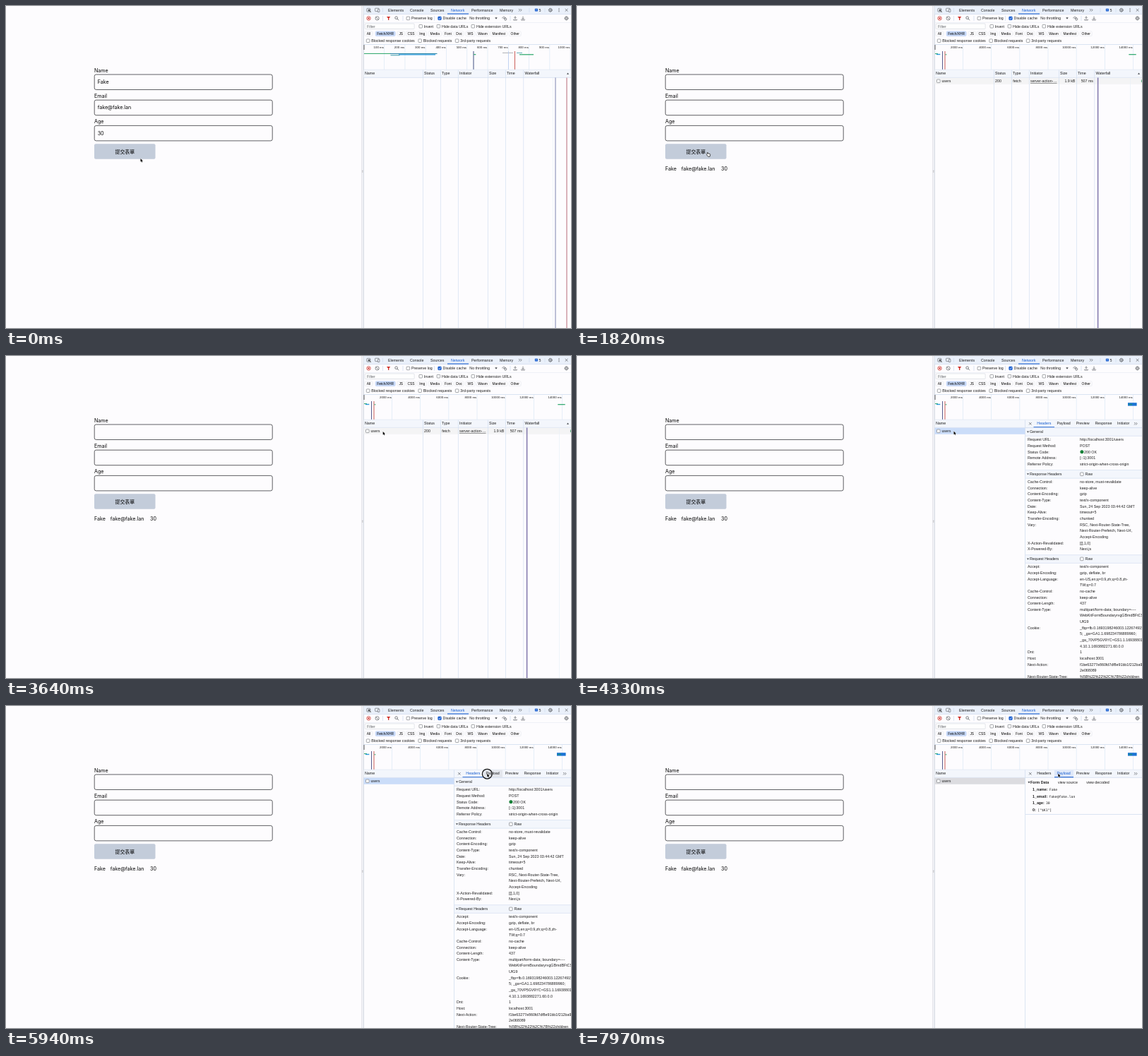
Animation of 800x456 px, one loop 8000 ms. Source, as an HTML page with a canvas:

```html
<!DOCTYPE html>
<html lang="en">
<head>
<meta charset="utf-8">
<title>Form action and network panel</title>
<style>
html, body { margin: 0; width: 100%; height: 100%; overflow: hidden; background: #fdfcfe; }
canvas { display: block; width: 800px; height: 456px; }
</style>
</head>
<body>
<canvas id="stage"></canvas>
<script>
const canvas = document.getElementById('stage');
const dpr = window.devicePixelRatio || 1;
canvas.width = 800 * dpr;
canvas.height = 456 * dpr;
const g = canvas.getContext('2d');

const LOOP = 8000, SUBMIT = 500, REPLY = 1030, OPEN = 3840, PAYLOAD = 6000;
const BG = '#fdfcfe', INK = '#1f1f1f', GREY = '#5a5d62', BLUE = '#1a5fd0', LINE = '#d3dff0';
const UI = '"Liberation Sans", Arial, sans-serif';
const FORM = 'Inter, "Noto Sans CJK TC", "Noto Sans CJK JP", "Noto Sans CJK", sans-serif';
const MONO = '"DejaVu Sans Mono", monospace';
const USER = { name: 'Fake', email: 'fake@fake.lan', age: '30' };

// ---- drawing helpers ----
function rect(x, y, w, h, color) {
  g.fillStyle = color;
  g.fillRect(x, y, w, h);
}
function round(x, y, w, h, r, fill, stroke, lw = 0.6) {
  g.beginPath();
  g.roundRect(x, y, w, h, r);
  if (fill) { g.fillStyle = fill; g.fill(); }
  if (stroke) { g.strokeStyle = stroke; g.lineWidth = lw; g.stroke(); }
}
function path(pts, color, lw = 0.7, close = false, fill = null) {
  g.beginPath();
  pts.forEach(([x, y], i) => i ? g.lineTo(x, y) : g.moveTo(x, y));
  if (close) g.closePath();
  if (fill) { g.fillStyle = fill; g.fill(); }
  if (color) { g.strokeStyle = color; g.lineWidth = lw; g.stroke(); }
}
function circle(x, y, r, stroke, lw = 0.7, fill = null) {
  g.beginPath();
  g.arc(x, y, r, 0, Math.PI * 2);
  if (fill) { g.fillStyle = fill; g.fill(); }
  if (stroke) { g.strokeStyle = stroke; g.lineWidth = lw; g.stroke(); }
}
function text(s, x, y, o = {}) {
  g.font = `${o.weight || 400} ${o.size || 5.3}px ${o.font || UI}`;
  g.fillStyle = o.color || INK;
  g.textAlign = o.align || 'left';
  g.fillText(s, x, y);
}
const vline = (x, y0, y1, c, w = 0.8) => rect(x - w / 2, y0, w, y1 - y0, c);
const hline = (x0, x1, y, c, w = 0.8) => rect(x0, y - w / 2, x1 - x0, w, c);

function check(x, y, label, on) {
  round(x - 2.3, y - 2.3, 4.6, 4.6, 0.9, on ? BLUE : '#fff', on ? BLUE : '#6b6e73', 0.6);
  if (on) path([[x - 1.3, y], [x - 0.3, y + 1.1], [x + 1.5, y - 1.2]], '#fff', 0.7);
  if (label) text(label, x + 4.6, y + 1.9);
}
function triangle(x, y, s, dir) {
  path([[x - s, y - s * 0.7 * dir], [x + s, y - s * 0.7 * dir], [x, y + s * 0.8 * dir]], null, 0, true, '#44474c');
}
function gear(x, y) {
  g.save();
  g.setLineDash([1, 0.85]);
  circle(x, y, 2.5, GREY, 1);
  g.restore();
  circle(x, y, 2, GREY, 0.7);
  circle(x, y, 0.7, GREY, 0.6);
}
function cross(x, y, s) {
  path([[x - s, y - s], [x + s, y + s]], GREY, 0.7);
  path([[x + s, y - s], [x - s, y + s]], GREY, 0.7);
}
function chevrons(x, y) {
  for (const d of [0, 2.4]) path([[x + d, y - 1.8], [x + d + 1.7, y], [x + d, y + 1.8]], GREY, 0.7);
}

// ---- form ----
function drawForm(t) {
  const sent = t >= SUBMIT, done = t >= REPLY;
  const o = { size: 7.1, font: FORM, color: '#000' };
  [['Name', USER.name], ['Email', USER.email], ['Age', USER.age]].forEach(([label, value], i) => {
    const y = 97 + i * 36.2;
    text(label, 125, y - 3, o);
    round(125.2, y, 252, 21.5, 2.5, null, '#2b2d31', 0.75);
    if (!sent) text(value, 129.7, y + 13.2, o);
  });
  round(125, 195.2, 86.5, 21.6, 2, '#c3ccda');
  const busy = sent && !done;
  text(busy ? 'Loading...' : '提交表單', 168.3, 208.5,
    { ...o, size: busy ? 7.1 : 6.9, weight: 500, align: 'center' });
  if (done) {
    text(USER.name, 125, 233.3, o);
    text(USER.email, 147.8, 233.3, o);
    text(USER.age, 204, 233.3, o);
  }
}

// ---- developer tools: bars ----
function drawBars() {
  rect(503.2, 0, 3.2, 456, '#f0f0f5');
  vline(503.3, 0, 456, '#dfe0e6', 0.6);
  vline(506.3, 0, 456, '#c8cfda', 0.7);
  rect(504.4, 232.8, 0.9, 0.9, '#888');
  rect(504.4, 234.6, 0.9, 0.9, '#888');

  rect(506.5, 0, 293.5, 11.6, '#eaf0fa');
  hline(506.5, 800, 11.7, LINE);
  round(510.8, 3.4, 5, 4.8, 0.8, null, GREY);
  path([[513.2, 5.4], [516.6, 8.8]], INK, 0.9);
  path([[513.2, 7.6], [513.2, 5.4], [515.6, 5.4]], INK, 0.8);
  round(522.6, 3.2, 5.4, 4.4, 0.6, null, GREY);
  round(526.3, 4.6, 2.6, 4, 0.5, '#eaf0fa', GREY);
  vline(533.5, 3, 9, LINE);
  const tabs = { Elements: 541, Console: 572, Sources: 601, Network: 630, Performance: 659, Memory: 699 };
  for (const name in tabs) text(name, tabs[name], 7.7, { color: name === 'Network' ? BLUE : INK });
  hline(625, 655, 11.1, BLUE, 1.1);
  chevrons(726, 5.8);
  vline(741, 3, 9, LINE);
  round(748.8, 3.8, 4.2, 3.6, 0.6, BLUE);
  hline(749.6, 752.2, 5.2, '#fff', 0.5);
  text('5', 754.6, 7.6);
  vline(763, 3, 9, LINE);
  gear(770.8, 5.8);
  for (const y of [3.8, 5.8, 7.8]) circle(783, y, 0.55, null, 0, INK);
  cross(793.6, 5.8, 1.9);

  circle(513.5, 17.4, 2.7, '#d0322b', 0.8);
  rect(512.4, 16.3, 2.2, 2.2, '#d0322b');
  circle(525.6, 17.4, 2.6, GREY, 0.7);
  path([[523.8, 15.6], [527.4, 19.2]], GREY, 0.7);
  vline(533.5, 14, 21, LINE);
  path([[539, 15], [544.2, 15], [542.3, 17.4], [542.3, 20], [541, 20], [541, 17.4]], null, 0, true, '#d0322b');
  circle(552.6, 16.7, 1.8, GREY, 0.8);
  path([[553.9, 18], [556, 20.2]], GREY, 0.8);
  vline(562, 14, 21, LINE);
  check(569.4, 17.4, 'Preserve log');
  vline(606.5, 14, 21, LINE);
  check(614, 17.4, 'Disable cache', true);
  text('No throttling', 656.3, 19.3);
  triangle(694, 17.5, 1.7, 1);
  for (const r of [1.6, 3.4]) {
    g.beginPath();
    g.arc(705, 19, r, Math.PI * 1.2, Math.PI * 1.8);
    g.strokeStyle = GREY; g.lineWidth = 0.7; g.stroke();
  }
  circle(707.2, 18.6, 1.5, GREY, 0.8, BG);
  vline(714, 14, 21, LINE);
  for (const [x, d] of [[721, -1], [732, 1]]) {
    path([[x, 17 - d * 2.3], [x, 17 + d * 1.8]], GREY, 0.7);
    path([[x - 1.5, 17 + d * 0.4], [x, 17 + d * 1.9], [x + 1.5, 17 + d * 0.4]], GREY, 0.7);
    path([[x - 2.3, 18.8], [x - 2.3, 20], [x + 2.3, 20], [x + 2.3, 18.8]], GREY, 0.7);
  }
  gear(793.5, 17.4);
  hline(506.5, 800, 23.3, '#e6ebf4', 0.6);

  round(508.3, 25, 69.8, 7.5, 1, '#fff', '#cfd3da', 0.6);
  text('Filter', 511, 30.7, { color: '#606368' });
  check(587.2, 28.7, 'Invert');
  check(612.4, 28.7, 'Hide data URLs');
  check(661.3, 28.7, 'Hide extension URLs');

  const chips = [['All', 508, 11], ['Fetch/XHR', 523, 28.3], ['JS', 554, 10.5], ['CSS', 566.5, 14],
    ['Img', 583, 12.5], ['Media', 598, 18.5], ['Font', 619, 14], ['Doc', 635.2, 13], ['WS', 651, 13],
    ['Wasm', 666, 18], ['Manifest', 686, 23.5], ['Other', 712.2, 17]];
  for (const [name, x, w] of chips) {
    const on = name === 'Fetch/XHR';
    round(x, 35.7, w, 7, 1.8, on ? '#c6d8f8' : null, on ? '#c6d8f8' : '#dfe2e8', 0.5);
    text(name, x + w / 2, 41, { size: 4.9, align: 'center', color: '#000' });
  }
  check(512.6, 49.2, 'Blocked response cookies');
  check(586.2, 49.2, 'Blocked requests');
  check(638.6, 49.2, '3rd-party requests');
  hline(506.5, 800, 54.6, LINE);
}

// ---- developer tools: overview strip ----
function drawOverview(t, cur) {
  const sent = t >= SUBMIT;
  const count = sent ? 7 : 10, step = sent ? 40.15 : 29.27, unit = sent ? 2000 : 100;
  for (let i = 1; i <= count; i++) {
    const x = 506.4 + i * step;
    vline(x, 55, 90, '#dbe8f5', 0.7);
    text(i * unit + ' ms', x - 0.7, 60.4, { size: 4.4, align: 'right' });
  }
  vline(507, 55, 62, '#333', 0.8);
  const green = '#27a567', teal = '#3a9aa8', blue = '#2a9bdc';
  if (!sent) {
    hline(507, 545, 67.4, green, 1);
    hline(544, 610.5, 67.5, '#2f87a8', 1.1);
    hline(556, 608, 68.9, blue, 1.3);
    hline(544.5, 557.5, 69.8, teal, 1);
    vline(662, 64, 90, '#2e3e74', 0.9);
    hline(662.3, 665.3, 68.7, green, 1.2);
    hline(703, 718, 66.3, '#9a9da3', 0.8);
    vline(711.5, 64, 90, '#b9cdf0', 0.8);
    vline(720.5, 64, 90, '#c64d48', 0.9);
    hline(723, 731, 66.3, teal, 0.8);
    hline(727, 747, 68.8, green, 1.2);
  } else {
    hline(507, 511, 67.6, green, 1);
    hline(509, 514.3, 68.5, blue, 1.4);
    vline(517.5, 64, 90, '#454b80', 0.9);
    vline(521, 64, 90, '#c64d48', 0.9);
    hline(521.6, 523.3, 68.8, green, 1.1);
    if (t >= OPEN) {
      rect(780, 66.2, 12.6, 4.4, '#1a73d4');
      hline(781, 786, 68.6, '#1c8f83', 1.6);
    } else if (t >= REPLY) hline(781.3, 791.7, 68.7, green, 1.2);
  }
  if (cur.y > 55 && cur.y < 89) vline(cur.x, 55, 90, '#2a4fa8', 0.9);
  hline(506.5, 800, 90.2, LINE);
}

// ---- developer tools: request table ----
function drawTable(t) {
  const sent = t >= SUBMIT, done = t >= REPLY;
  rect(506.5, 90.5, 293.5, 10.6, '#f3f6fc');
  hline(506.5, 800, 101.3, LINE);
  if (sent) {
    rect(506.5, 101.8, 293.5, 9, '#f4f4f5');
    check(511.8, 106.3);
    text('users', 516.4, 108.1);
    text(done ? '200' : '(pending)', 592, 108.1);
    text('fetch', 617.2, 108.1);
    text('server-action-…', 642, 108.1);
    hline(642, 679.5, 109.2, INK, 0.45);
    text(done ? '1.9 kB' : '0 B', 705.4, 108.1, { align: 'right' });
    text(done ? '507 ms' : 'Pending', 731, 108.1, { align: 'right' });
  }
  const cols = [['Name', 508], ['Status', 592], ['Type', 617], ['Initiator', 642], ['Size', 684], ['Time', 709], ['Waterfall', 734.5]];
  for (const [name, x] of cols) {
    text(name, x, 97.4);
    if (x > 508) vline(x - 1.7, 90.5, 456, LINE, 0.7);
  }
  triangle(795.5, 95.8, 1.5, -1);
  vline(sent ? 783.3 : 774.5, 101.5, 456, '#e6eef7', 0.6);
  if (!sent) {
    vline(778, 101.5, 456, '#6f78a8', 0.9);
    vline(794, 101.5, 456, '#b05a68', 0.9);
  } else if (!done) {
    vline(737.2, 101.5, 456, '#6f72b4', 1);
    vline(738.8, 101.5, 456, '#d99a9e', 0.9);
  } else {
    vline(737.6, 101.5, 456, '#857cae', 1.6);
    rect(798.9, 104.5, 1.1, 3.5, '#69b98c');
  }
}

// ---- developer tools: request details ----
const GENERAL = [['Request URL:', 'http://localhost:3001/users'], ['Request Method:', 'POST'],
  ['Status Code:', '200 OK'], ['Remote Address:', '[::1]:3001'], ['Referrer Policy:', 'strict-origin-when-cross-origin']];
const RESPONSE = [['Cache-Control:', 'no-store, must-revalidate'], ['Connection:', 'keep-alive'],
  ['Content-Encoding:', 'gzip'], ['Content-Type:', 'text/x-component'], ['Date:', 'Sun, 24 Sep 2023 03:44:42 GMT'],
  ['Keep-Alive:', 'timeout=5'], ['Transfer-Encoding:', 'chunked'], ['Vary:', 'RSC, Next-Router-State-Tree,'],
  ['', 'Next-Router-Prefetch, Next-Url,'], ['', 'Accept-Encoding'], ['X-Action-Revalidated:', '[[],1,0]'], ['X-Powered-By:', 'Next.js']];
const REQUEST = [['Accept:', 'text/x-component'], ['Accept-Encoding:', 'gzip, deflate, br'],
  ['Accept-Language:', 'en-US,en;q=0.9,zh;q=0.8,zh-'], ['', 'TW;q=0.7'], ['Cache-Control:', 'no-cache'],
  ['Connection:', 'keep-alive'], ['Content-Length:', '437'], ['Content-Type:', 'multipart/form-data; boundary=----'],
  ['', 'WebKitFormBoundaryrvgGBmdBFtCS'], ['', 'UfG9'], ['Cookie:', '_fbp=fb.0.1693198246003.122674915'],
  ['', '5; _ga=GA1.1.698234786889960;'], ['', '_ga_70VP5GV9YC=GS1.1.169388011'], ['', '4.10.1.1693882271.60.0.0'],
  ['Dnt:', '1'], ['Host:', 'localhost:3001'], ['Next-Action:', 'f1be63277e860fd7df8e91bb1f212ba9'],
  ['', '2e068089'], ['Next-Router-State-Tree:', '%5B%22%22%2C%7B%22children']];

function section(title, y, rows, raw) {
  rect(635, y - 7.4, 165, 11.2, '#f3f6fc');
  hline(635, 800, y - 7.5, LINE, 0.7);
  hline(635, 800, y + 3.9, LINE, 0.7);
  triangle(638.5, y - 1.8, 1.5, 1);
  text(title, 641, y);
  if (raw) check(714.8, y - 1.9, 'Raw');
  rows.forEach(([key, value], i) => {
    const by = y + 11 + i * 8.64;
    const dot = key === 'Status Code:';
    text(key, 638, by);
    if (dot) circle(714.9, by - 1.9, 2.5, null, 0, '#188038');
    text(value, dot ? 718 : 712, by);
  });
}
function drawPayload() {
  triangle(640, 108.2, 1.6, 1);
  text('Form Data', 642, 110, { weight: 700 });
  text('view source', 681, 110);
  text('view decoded', 721.3, 110);
  const rows = [['1_name:', USER.name, 668.8], ['1_email:', USER.email, 668.3], ['1_age:', USER.age, 663.9], ['0:', '["$K1"]', 652.3]];
  rows.forEach(([key, value, x], i) => {
    const y = 120.3 + i * 9.5;
    text(key, 645, y, { weight: 700 });
    text(value, x, y, { size: 4.73, font: MONO });
  });
  hline(635, 800, 153.4, LINE);
}
function drawDetails(t, cur) {
  const payload = t >= PAYLOAD;
  rect(506.5, 90.5, 293.5, 10.6, '#f3f6fc');
  hline(506.5, 800, 101.3, LINE);
  text('Name', 508, 97.4);
  rect(506.5, 101.8, 128, 9, payload ? '#dcdce0' : '#cbddf9');
  check(511.8, 106.3);
  text('users', 516.4, 108.1);
  cross(641.8, 95.8, 1.7);
  const hover = cur.x > 676 && cur.x < 703 && cur.y > 90 && cur.y < 101;
  if (payload || hover) rect(676, 90.6, 27, 10.4, payload ? '#dfe8f9' : '#e3e6ec');
  const tabs = { Headers: 651.3, Payload: 679.5, Preview: 706.8, Response: 733.5, Initiator: 765 };
  const active = payload ? 'Payload' : 'Headers';
  for (const name in tabs) text(name, tabs[name], 97.4, { color: name === active ? BLUE : INK });
  if (payload) hline(676, 703, 100.8, BLUE, 1.1);
  else hline(646.5, 676, 100.8, BLUE, 1.1);
  chevrons(789, 95.8);
  if (payload) drawPayload();
  else {
    section('General', 109.3, GENERAL);
    section('Response Headers', 169.2, RESPONSE, true);
    section('Request Headers', 289.3, REQUEST, true);
  }
  vline(634.5, 90.5, 456, LINE);
}

// ---- pointer ----
const MOVES = [[0, 190.5, 216], [360, 184.6, 207.6], [820, 184, 207.2], [2700, 184, 207.2], [2760, 185.5, 206.2],
  [2940, 185.5, 206.2], [3200, 534, 108], [3580, 534, 107.6], [3680, 533.5, 106.6], [4390, 533.5, 106.6],
  [5020, 650, 86], [5140, 650, 86], [5720, 681.3, 95.8], [LOOP, 681.3, 95.8]];
const CLICKS = [380, 3720, 5880];

function pointerAt(t) {
  let i = 1;
  while (t > MOVES[i][0]) i++;
  const [t0, x0, y0] = MOVES[i - 1], [t1, x1, y1] = MOVES[i];
  const p = (t - t0) / (t1 - t0), e = p * p * (3 - 2 * p);
  return { x: x0 + (x1 - x0) * e, y: y0 + (y1 - y0) * e };
}
function drawPointer(t, { x, y }) {
  for (const c of CLICKS) {
    if (t < c || t >= c + 240) continue;
    g.globalAlpha = Math.min(1, (c + 240 - t) / 120);
    circle(x, y + 0.4, 6.9, '#111', 1.3);
    g.globalAlpha = 1;
  }
  g.save();
  g.translate(x, y);
  g.lineJoin = 'round';
  const onButton = x > 125 && x < 211 && y > 195 && y < 215;
  if (onButton) {
    path([[0.3, 0.4], [1.3, 0.4], [1.7, 1.9], [4.2, 2.2], [4.7, 3.2], [4.1, 6], [1.6, 6], [-0.5, 3.4], [0.2, 3]], '#222', 0.8, true, '#fff');
  } else if (y > 55 && y < 89) {
    vline(0.5, -1, 4.5, INK, 0.8);
    hline(-0.6, 1.6, -1, INK, 0.6);
    hline(-0.6, 1.6, 4.5, INK, 0.6);
  } else {
    const arrow = [[0, 0], [0, 4.6], [1, 3.7], [1.8, 5.4], [2.6, 5], [1.9, 3.4], [3.3, 3.3]];
    path(arrow, '#fff', 1, true);
    path(arrow, null, 0, true, '#000');
  }
  g.restore();
}

function draw(t) {
  g.setTransform(dpr, 0, 0, dpr, 0, 0);
  rect(0, 0, 800, 456, BG);
  const cur = pointerAt(t);
  drawForm(t);
  drawBars();
  drawOverview(t, cur);
  if (t < OPEN) drawTable(t);
  else drawDetails(t, cur);
  drawPointer(t, cur);
}

const start = performance.now();
function tick() {
  draw((performance.now() - start) % LOOP);
  requestAnimationFrame(tick);
}
tick();
</script>
</body>
</html>
```
